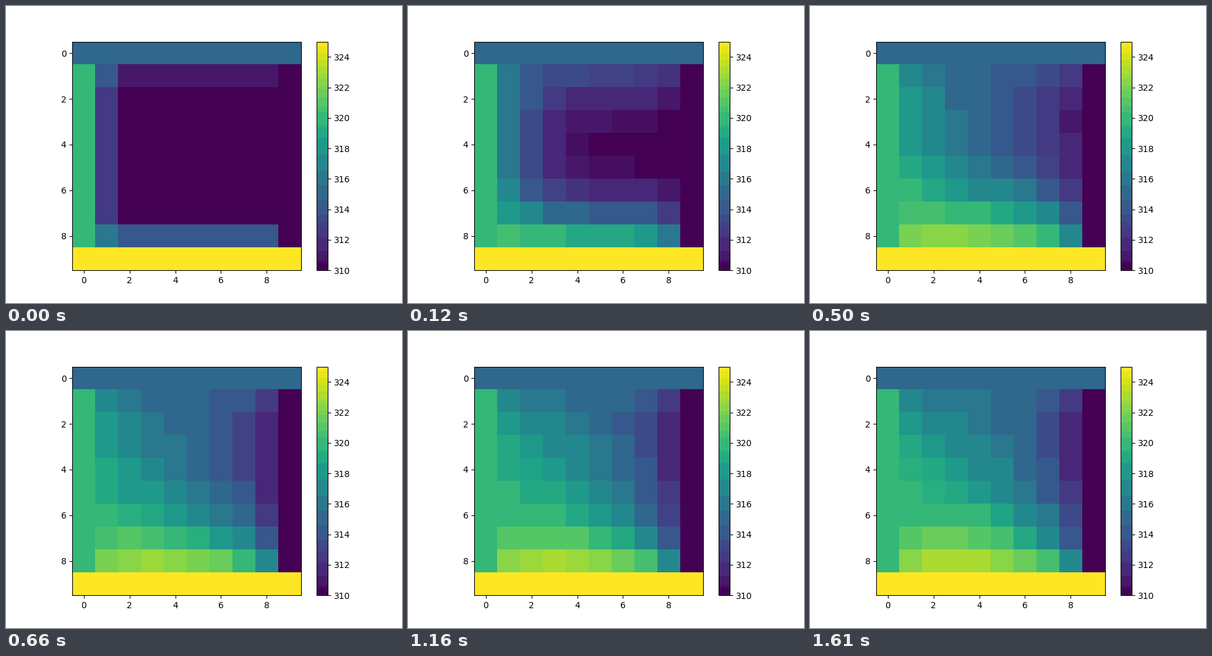
Animation of 640 by 480 pixels, one loop 3.39 s. Source, as a matplotlib script:

```python
import matplotlib.pyplot as plt
import numpy as np
from matplotlib.animation import FuncAnimation
from matplotlib.colors import BoundaryNorm, ListedColormap

SIZE = 10
LOW, HIGH = 310, 325
FRAME_MS = 10
FRAMES = 339
FRAMES_PER_STEP = 2

# Upper limits of the colour bands, in degrees above LOW.
LIMITS = [0.5, 0.66, 1.28, 2.1, 2.3, 2.8, 3.12, 3.65, 4.6, 5.55, 6.511,
          7.52, 7.62, 8.64, 8.75, 9.36, 9.507, 10.37, 10.75, 11.33,
          11.87, 12.1, 12.6, 12.88, 13.35, 13.8, 14.25, 14.7]


def start_plate():
    plate = np.full((SIZE, SIZE), float(LOW))
    plate[:, 0] = 320
    plate[0] = 315
    plate[-1] = HIGH
    return plate


def relax(plate):
    """One Jacobi step: each inner cell becomes the mean of its neighbours."""
    result = plate.copy()
    result[1:-1, 1:-1] = (plate[:-2, 1:-1] + plate[2:, 1:-1]
                          + plate[1:-1, :-2] + plate[1:-1, 2:]) / 4
    return result


def band_colour(low, high):
    """Colour of an edge temperature inside the band, else of its middle."""
    fixed = [t for t in (0, 5, 10, 15) if low <= t <= high]
    value = fixed[0] if fixed else (low + high) / 2
    return plt.cm.viridis(value / (HIGH - LOW))


edges = [0, *LIMITS, HIGH - LOW]
cmap = ListedColormap([band_colour(a, b) for a, b in zip(edges, edges[1:])])
norm = BoundaryNorm([LOW + e for e in edges], cmap.N)

states = [relax(start_plate())]
while len(states) * FRAMES_PER_STEP < FRAMES:
    states.append(relax(states[-1]))

fig, ax = plt.subplots(figsize=(6.4, 4.8), dpi=100)
image = ax.imshow(states[0], cmap=cmap, norm=norm, interpolation="nearest")
bar = fig.colorbar(image, ax=ax, spacing="proportional",
                   ticks=range(LOW, HIGH, 2))
bar.minorticks_off()


def update(frame):
    image.set_data(states[frame // FRAMES_PER_STEP])
    return [image]


anim = FuncAnimation(fig, update, frames=FRAMES, interval=FRAME_MS,
                     repeat=True, repeat_delay=0)
plt.show()
```
